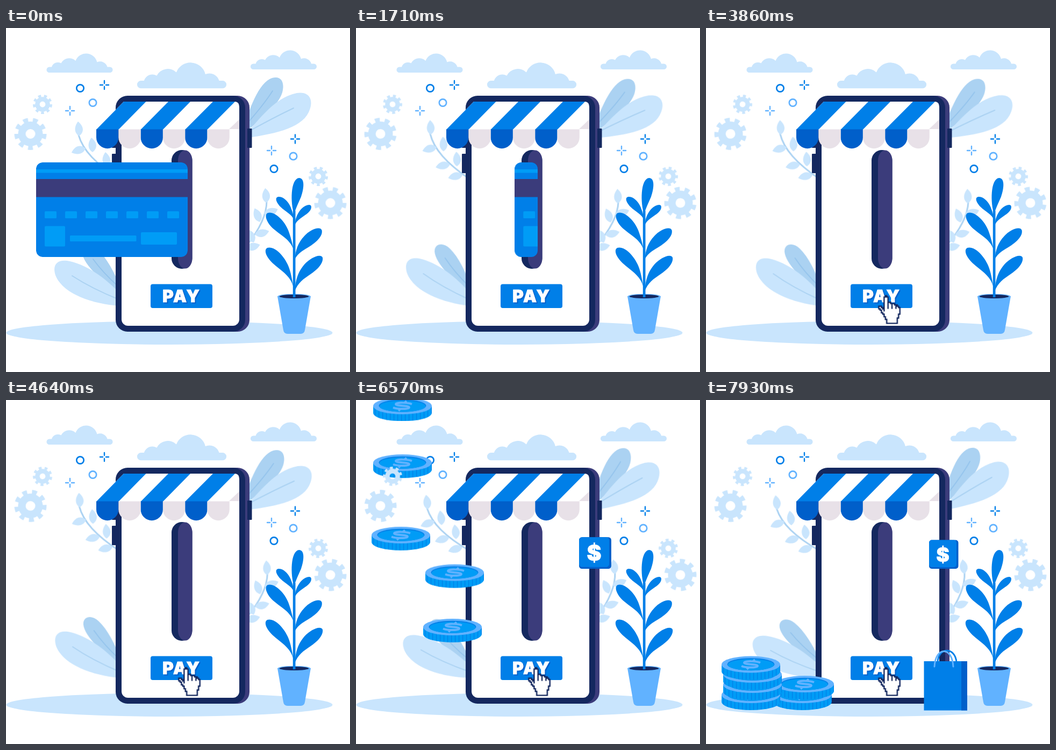
An HTML page without scripts for the animation above (8000 ms loop, 640 by 640 pixels).

```html
<!DOCTYPE html>
<html lang="en">
<head>
<meta charset="utf-8">
<title>Mobile payment</title>
<style>
:root {
  --blue: #007fe8; --deep: #005fca; --sky: #009cf6; --light: #61b2ff;
  --pale: #c9e5fd; --mist: #abd2f2; --navy: #14285f; --plum: #3b3c7b;
}
html, body { margin: 0; width: 100%; height: 100%; overflow: hidden; background: #fff; }
svg { display: block; width: 100%; height: 100%; }
text { font-family: Inter, "Open Sans", sans-serif; font-weight: 900; text-anchor: middle; }
.line { fill: none; stroke-linecap: round; }

.sway { animation: sway 8s infinite; }
@keyframes sway {
  0%, 4.6% { transform: rotate(0deg); animation-timing-function: cubic-bezier(.39, .575, .565, 1); }
  34.8% { transform: rotate(var(--a)); animation-timing-function: cubic-bezier(.37, 0, .63, 1); }
  95.4%, 100% { transform: rotate(calc(-1 * var(--a))); }
}
.spin { animation: spin 8s linear infinite; }
.back { animation-name: unspin; }
@keyframes spin { 0%, 5.4% { transform: rotate(0deg); } 100% { transform: rotate(281deg); } }
@keyframes unspin { 0%, 5.4% { transform: rotate(0deg); } 100% { transform: rotate(-281deg); } }

.card { animation: insert 8s infinite; }
@keyframes insert {
  0%, 5.4% { transform: translateX(0); animation-timing-function: cubic-bezier(.37, 0, .63, 1); }
  26.9%, 100% { transform: translateX(282px); }
}
.hand { animation: reach 8s infinite; }
@keyframes reach {
  0%, 28% { transform: translateY(150px); animation-timing-function: cubic-bezier(.3, .5, .4, 1); }
  35.5%, 36% { transform: translate(-.5px, -1.5px); }
  38.5%, 100% { transform: none; }
}
/* the group hides coins still resting from the previous loop */
.coins { animation: show 8s step-end infinite; }
@keyframes show { 0% { opacity: 0; } 72%, 100% { opacity: 1; } }
.coin { animation: fall 8s linear var(--wait) infinite both; }
@keyframes fall {
  0%, 74.63% { transform: translateY(-600px); }
  84.23%, 100% { transform: none; }
}
.tag { transform-origin: 415px 314px; animation: tag 8s infinite; }
@keyframes tag {
  0%, 78.4% { transform: scale(0); animation-timing-function: ease-out; }
  82.1% { transform: scale(1.1); }
  85.5%, 100% { transform: none; }
}
.bag { transform-origin: 445px 578px; animation: bag 8s infinite; }
@keyframes bag {
  0%, 91% { transform: scale(0); animation-timing-function: ease-out; }
  95.5% { transform: scale(1.08); }
  98.5%, 100% { transform: none; }
}
</style>
</head>
<body>
<svg viewBox="0 0 640 640">
<defs>
  <path id="cloud" fill="var(--pale)" d="M5.2 35a5.2 5.2 0 0 1 0-10.5H9.5A12 12 0 0 1 27 17.500A17 17 0 0 1 54 13A21 21 0 0 1 94 15.500A14 14 0 0 1 113 24.500H117.8a5.2 5.2 0 0 1 0 10.500z"/>
  <path id="leaf" fill="var(--pale)" d="M0 0C-10-6-10-17-3-27C8-19 10-8 0 0z"/>
  <path id="plus" class="line" stroke-width="2.4" d="M-8 0h5M3 0h5M0-8v5M0 3v5"/>
  <circle id="ring" r="6.7" fill="none" stroke-width="2.7"/>
  <path id="flap" d="M0 0h41.3v15a20.65 20.65 0 0 1-41.3 0z"/>
  <rect id="chip" y="341" width="22" height="13" rx="1.5"/>
  <g id="gear" fill="none" stroke="var(--pale)">
    <circle r="16" stroke-width="14"/>
    <circle r="26" stroke-width="8" pathLength="18" stroke-dasharray="1 1"/>
  </g>
  <pattern id="ridges" width="7" height="60" patternUnits="userSpaceOnUse">
    <rect width="7" height="60" fill="var(--sky)"/>
    <rect x="3" width="1.2" height="60" fill="var(--blue)"/>
  </pattern>
  <g id="coin">
    <path fill="url(#ridges)" d="M0 15.5v13a54.5 15.5 0 0 0 109 0v-13z"/>
    <ellipse cx="54.5" cy="15.5" rx="54.5" ry="15.5" fill="var(--light)"/>
    <ellipse cx="54.5" cy="15.2" rx="44" ry="11.5" fill="var(--blue)"/>
    <ellipse cx="54.5" cy="16.2" rx="43" ry="10.5" fill="var(--sky)"/>
    <path fill="none" stroke="var(--light)" stroke-width="4" d="M72 12.2C65 9 42 8.500 42 12.300C42 16 67 14.500 67 18.300C67 22 45 22 37 18.500M62 6.500L58 10M51 20.500L47 24.500"/>
  </g>
  <clipPath id="mouth"><rect x="56" y="250" width="282" height="176" rx="12"/></clipPath>
</defs>

<ellipse cx="304" cy="567" rx="303.5" ry="22" fill="var(--pale)"/>
<use href="#cloud" x="75.5" y="48"/>
<use href="#cloud" x="455" y="42"/>
<use href="#cloud" transform="translate(244 65) scale(1.35)"/>

<!-- large leaves -->
<g class="sway" style="--a:3.2deg; transform-origin:443px 204px">
  <path fill="var(--mist)" d="M440 192C452 152 470 101 495 93C512 88 519 101 514 120C506 145 478 165 445 195z"/>
  <path class="line" stroke="#93c3ec" stroke-width="1.8" d="M496 117Q480 142 450 176"/>
  <path fill="var(--pale)" d="M438 206C465 180 495 130 541 121C567 117 573 137 563 157C548 188 495 198 438 206z"/>
  <path class="line" stroke="var(--mist)" stroke-width="2" d="M535 149Q495 168 445 196"/>
</g>
<g class="sway" style="--a:3.2deg; transform-origin:211px 513px">
  <path fill="var(--mist)" d="M212 490C182 476 144 440 142 419C141 403 158 401 170 412C188 428 201 454 214 484z"/>
  <path class="line" stroke="#93c3ec" stroke-width="1.8" d="M162 430Q180 455 210 482"/>
  <path fill="var(--pale)" d="M214 517C170 515 107 498 92 460C85 438 98 429 119 434C155 442 190 470 214 496z"/>
  <path class="line" stroke="var(--mist)" stroke-width="2" d="M123 461Q160 485 210 505"/>
</g>

<!-- branches -->
<g class="sway" style="--a:2.6deg; transform-origin:206px 278px">
  <path class="line" stroke="var(--mist)" stroke-width="3" d="M135 199C143 228 168 253 210 280"/>
  <use href="#leaf" transform="translate(136 201) rotate(2)"/>
  <use href="#leaf" transform="translate(148 224) rotate(-100)"/>
  <use href="#leaf" transform="translate(161 231) rotate(2)"/>
  <use href="#leaf" transform="translate(174 255) rotate(-97)"/>
  <use href="#leaf" transform="translate(187 258) rotate(2)"/>
  <use href="#leaf" transform="translate(198 274) rotate(-97)"/>
</g>
<g class="sway" style="--a:2.8deg; transform-origin:450px 402px">
  <path class="line" stroke="var(--mist)" stroke-width="3" d="M485 322C485 348 470 377 448 404"/>
  <use href="#leaf" transform="translate(484 325) rotate(3)"/>
  <use href="#leaf" transform="translate(472 361) rotate(-14)"/>
  <use href="#leaf" transform="translate(480 346) rotate(77)"/>
  <use href="#leaf" transform="translate(461 399) rotate(-20)"/>
  <use href="#leaf" transform="translate(463 384) rotate(83)"/>
  <use href="#leaf" transform="translate(446 409) rotate(84)"/>
</g>

<!-- sparkles -->
<g stroke="var(--blue)">
  <use href="#ring" x="138" y="112"/><use href="#ring" x="498.5" y="262"/>
  <use href="#plus" x="183" y="106"/><use href="#plus" x="538" y="206.5"/>
</g>
<g stroke="var(--light)">
  <use href="#ring" x="161.5" y="139"/><use href="#ring" x="534.5" y="238.5"/>
  <use href="#plus" x="119" y="154"/><use href="#plus" x="494" y="228"/>
</g>

<!-- phone -->
<g fill="var(--navy)">
  <rect x="197" y="187" width="12" height="36" rx="1"/>
  <rect x="197" y="234" width="12" height="36" rx="1"/>
  <rect x="214" y="126" width="239" height="439" rx="22" fill="var(--plum)"/>
  <rect x="449" y="187" width="8.5" height="36" rx="1"/>
  <rect x="204" y="126" width="241" height="439" rx="22"/>
  <rect x="215" y="137" width="219" height="417" rx="12" fill="#fff"/>
  <rect x="308" y="227" width="38.5" height="221" rx="19.25"/>
  <rect x="320" y="227.5" width="26.5" height="220" rx="13.25" ry="19" fill="var(--plum)"/>
</g>

<!-- awning -->
<path fill="#fff" d="M168 189L219 137H426Q434 137 434 148V170L416 189z"/>
<path fill="#e8e1e8" d="M434 170V188H415z"/>
<path fill="var(--blue)" d="M168 189L219 137H260.5L209.3 189zM250.6 189L302 137H343L291.9 189zM333.2 189L385 137H426L374.5 189z"/>
<g fill="var(--deep)">
  <use href="#flap" x="168" y="188.5"/><use href="#flap" x="250.6" y="188.5"/><use href="#flap" x="333.2" y="188.5"/>
</g>
<g fill="#e8e1e8">
  <use href="#flap" x="209.3" y="188.5"/><use href="#flap" x="291.9" y="188.5"/><use href="#flap" x="374.5" y="188.5"/>
</g>

<!-- card, cut off where it enters the slot -->
<g clip-path="url(#mouth)">
  <g class="card" fill="var(--sky)">
    <rect x="56" y="250" width="282" height="176" rx="12" fill="var(--blue)"/>
    <rect x="56" y="263" width="282" height="6.5"/>
    <rect x="56" y="281" width="282" height="33.5" fill="var(--plum)"/>
    <use href="#chip" x="72"/><use href="#chip" x="110"/><use href="#chip" x="148"/><use href="#chip" x="186"/>
    <use href="#chip" x="224"/><use href="#chip" x="262"/><use href="#chip" x="300"/>
    <rect x="72" y="368.5" width="38" height="38" rx="2"/>
    <rect x="119" y="386" width="123.5" height="11" rx="1.5"/>
    <rect x="251" y="380" width="67" height="23" rx="2"/>
  </g>
</g>

<!-- pay button -->
<rect x="269" y="476.5" width="115" height="44.5" rx="4" fill="var(--blue)"/>
<g font-size="31.5" letter-spacing="2" stroke-width="1">
  <text x="328.5" y="512" fill="var(--deep)" stroke="var(--deep)">PAY</text>
  <text x="326.5" y="510" fill="#fff" stroke="#fff">PAY</text>
</g>
<g class="hand">
  <g transform="translate(321.5 498) scale(2.45)" fill="#fff" stroke="var(--navy)">
    <path d="M4 12V1H5V0H6V1H7V5H9V6H12V7H14V8H15V9H16V14H15V17H14V21H6V18H5V16H4V14H3V13H2V11H1V10H0V8H2V9H3V10H4z"/>
    <path fill="none" d="M7 5V10M10 6V10M13 7V10"/>
  </g>
</g>

<!-- coins -->
<g class="coins">
  <g class="coin" style="--wait:-6ms"><use href="#coin" x="125" y="533"/></g>
  <g class="coin" style="--wait:98ms"><use href="#coin" x="129" y="513"/></g>
  <g class="coin" style="--wait:213ms"><use href="#coin" x="29" y="533"/></g>
  <g class="coin" style="--wait:361ms"><use href="#coin" x="32" y="514"/></g>
  <g class="coin" style="--wait:472ms"><use href="#coin" x="32" y="495"/></g>
  <g class="coin" style="--wait:600ms"><use href="#coin" x="29" y="476.5"/></g>
</g>

<!-- gears -->
<g transform="translate(45.5 197)"><use href="#gear" class="spin"/></g>
<g transform="translate(68 142) scale(.6)"><use href="#gear" class="spin back"/></g>
<g transform="translate(603.5 325.5)"><use href="#gear" class="spin"/></g>
<g transform="translate(581 276) scale(.6)"><use href="#gear" class="spin back"/></g>

<!-- plant -->
<path fill="var(--light)" d="M505 499H567L556 562Q555 569 548 569H524Q517 569 516 562z"/>
<ellipse cx="536" cy="499.5" rx="31" ry="4.8" fill="var(--light)"/>
<ellipse cx="536" cy="499.5" rx="27.5" ry="3.4" fill="var(--navy)"/>
<g fill="var(--blue)">
  <path d="M533.8 340H538.5V501H533.8z"/>
  <path d="M536 347C529 326 529 281 545 279C557 279 554 300 549 314C544 326 539 335 536 347z"/>
  <path d="M536 358C532 346 520 342 511 333C503 325 499 315 507 314C517 313 528 326 531 337C534 345 535 350 536 358z"/>
  <path d="M537 368C538 354 542 345 549 337C557 329 568 326 568 333C568 341 558 347 551 352C544 357 540 360 537 368z"/>
  <path d="M535 412C528 393 513 387 498 374C486 364 479 348 487 344C499 340 518 358 525 376C530 389 532 398 535 412z"/>
  <path d="M537 431C539 412 543 400 555 387C566 375 584 368 587.5 376C590 386 579 397 567 405C553 414 543 418 537 431z"/>
  <path d="M535 483C530 462 514 453 499 440C486 429 478 414 486 409C499 405 517 423 525 442C530 454 532 467 535 483z"/>
  <path d="M537 490C539 466 544 453 555 440C567 427 585 419 589 427C591 437 580 449 568 457C553 467 543 474 537 490z"/>
</g>

<!-- price tag and shopping bag -->
<g class="tag">
  <rect x="415" y="260.5" width="54.5" height="53.5" rx="5" fill="var(--deep)"/>
  <rect x="415" y="260.5" width="51" height="50.5" rx="5" fill="var(--blue)"/>
  <text x="440.5" y="300.5" font-size="37" fill="#fff" stroke="#fff" stroke-width=".6">$</text>
</g>
<g class="bag">
  <path class="line" stroke="var(--blue)" stroke-width="3" d="M431 488C432 459 464 459 466 488"/>
  <path fill="var(--blue)" d="M405.5 486H486V577.5H405.5z"/>
  <path fill="var(--deep)" d="M475 486H486V577.5H475z"/>
  <path class="line" stroke="var(--light)" stroke-width="3" d="M425 496C427 458 458 458 460 496"/>
</g>
</svg>
</body>
</html>
```
